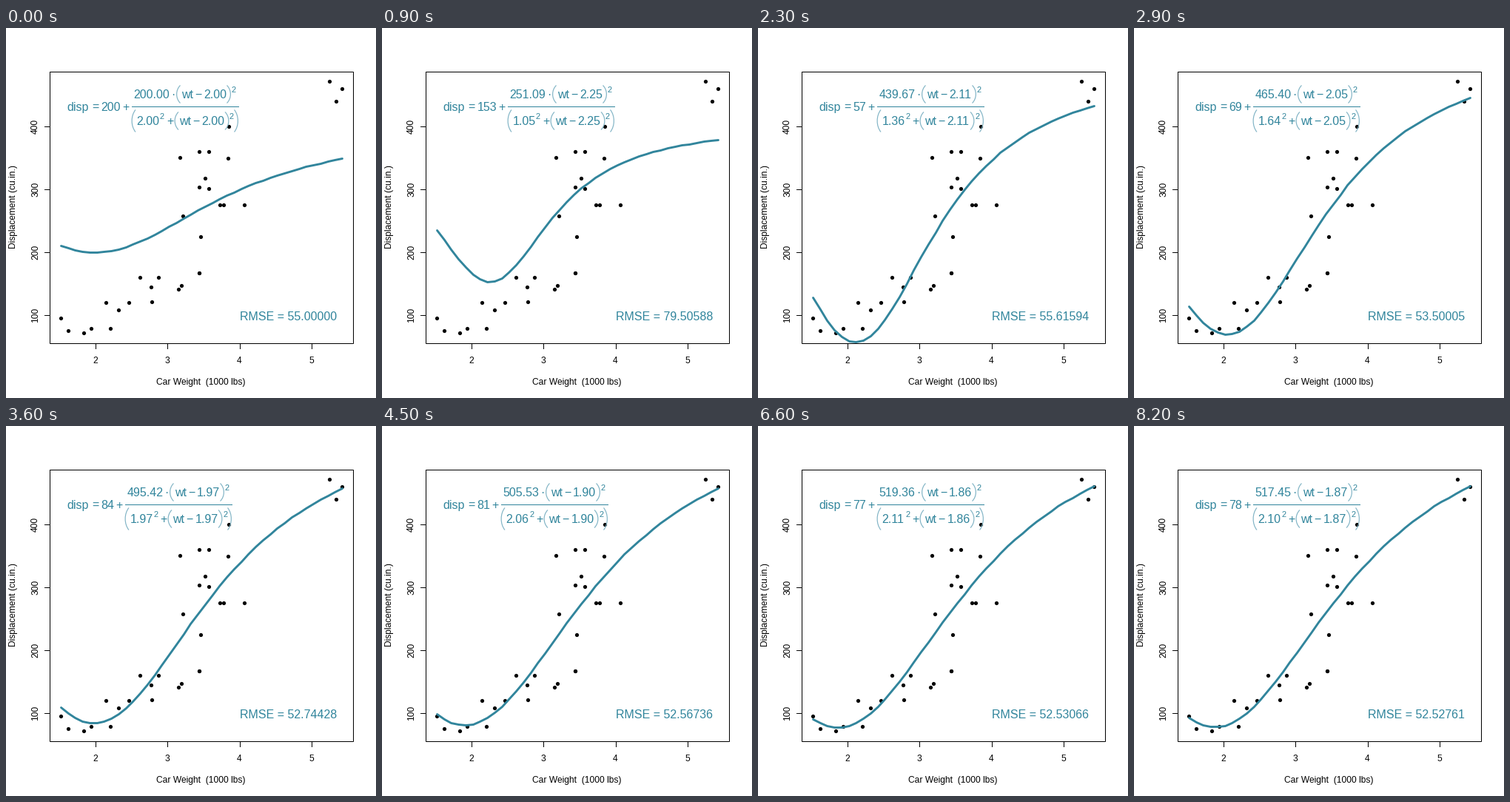
Write a matplotlib script that moves like this. It is 500 px wide and 500 px high and loops after 8300 ms.

```python
import numpy as np
import matplotlib.pyplot as plt
from matplotlib.animation import FuncAnimation
from matplotlib.patches import Circle, PathPatch, Rectangle
from matplotlib.path import Path
from matplotlib.transforms import Affine2D

SIZE, DPI = 500, 100
PT = 72 / DPI                      # points per pixel
TEAL, PALE = "#31859c", "#83b5c6"
FRAMES, INTERVAL = 83, 100
LEFT, RIGHT, TOP, BOTTOM = 59.04, 469.76, 59.04, 426.56

plt.rcParams["font.family"] = "Liberation Sans"

# Car weights by engine displacement
CARS = {71.1: [1.835], 75.7: [1.615], 78.7: [2.2], 79: [1.935], 95.1: [1.513],
        108: [2.32], 120.1: [2.465], 120.3: [2.14], 121: [2.78], 140.8: [3.15],
        145: [2.77], 146.7: [3.19], 160: [2.62, 2.875], 167.6: [3.44, 3.44],
        225: [3.46], 258: [3.215], 275.8: [3.73, 3.78, 4.07], 301: [3.57],
        304: [3.435], 318: [3.52], 350: [3.84], 351: [3.17], 360: [3.44, 3.57],
        400: [3.845], 440: [5.345], 460: [5.424], 472: [5.25]}
disp, weight = np.array([(d, w) for d, ws in CARS.items() for w in ws]).T

# Search path: step -> base, gain, centre, spread
SEARCH = {0: (200, 200, 2, 2),
          9: (153, 251.09, 2.25, 1.05),
          23: (57, 439.67, 2.11, 1.36),
          36: (84, 495.42, 1.97, 1.97),
          54: (78, 515.64, 1.83, 2.15),
          66: (77, 519.36, 1.86, 2.11),
          82: (78, 517.45, 1.87, 2.10)}
START_RMSE = 55


def params(step):
    return [np.interp(step, list(SEARCH), column) for column in zip(*SEARCH.values())]


def model(w, base, gain, centre, spread):
    square = (w - centre) ** 2
    return base + gain * square / (spread ** 2 + square)


def to_pixel(values, data, start, end):
    """Map data to whole pixels with a 4 % margin on both sides."""
    low, high = data.min(), data.max()
    pad = 0.04 * (high - low)
    return np.floor(start + (end - start) * (values - low + pad) / (high - low + 2 * pad))


def px(w):
    return to_pixel(w, weight, LEFT, RIGHT)


def py(d):
    return to_pixel(d, disp, BOTTOM, TOP)


fig = plt.figure(figsize=(SIZE / DPI, SIZE / DPI), dpi=DPI, facecolor="white")
ax = fig.add_axes([0, 0, 1, 1])
ax.set_xlim(0, SIZE)
ax.set_ylim(SIZE, 0)
ax.axis("off")

# The formula slides when its first number loses a digit
slide = Affine2D()
sliding = slide + ax.transData


def label(x, y, text, size=12, color="black", **kw):
    kw = {"ha": "center", "va": "baseline", "rotation_mode": "anchor", **kw}
    return ax.text(x, y, text, fontsize=size * PT, color=color, zorder=5, **kw)


def teal(x, y, text="", size=16, **kw):
    return label(x, y, text, size, TEAL, ha="left", **kw)


def term(x, y, text="", size=16):
    return teal(x, y, text, size, transform=sliding)


def rule(xs, ys, color="black", **kw):
    ax.plot(xs, ys, color=color, lw=PT, solid_capstyle="projecting",
            solid_joinstyle="miter", snap=True, zorder=2, **kw)


def paren(x, middle, half, side):
    """Thin bracket; side is 1 for opening, -1 for closing."""
    tip, bend, pull = x + 2.5 * side, x - 4 * side, 0.46 * half
    path = Path([(tip, middle - half), (bend, middle - pull),
                 (bend, middle + pull), (tip, middle + half)],
                [Path.MOVETO] + [Path.CURVE4] * 3)
    ax.add_patch(PathPatch(path, fill=False, ec=PALE, lw=1.2 * PT, zorder=5,
                           transform=sliding))


def squared_term(x, y):
    """(wt - centre)^2 from its opening bracket; returns the number's text."""
    paren(x, y - 5.5, 12, 1)
    term(x + 4, y, "wt")
    term(x + 22, y, "−")
    number = term(x + 34, y)
    paren(x + 68, y - 5.5, 12, -1)
    term(x + 71.5, y - 8, "2", 11)
    return number


# Frame and axes
rule([59, 469, 469, 59, 59], [59, 59, 426, 426, 59])
for w in range(2, 6):
    rule([px(w)] * 2, [426, 433])
    label(px(w) - 0.5, 453, str(w))
for d in range(100, 500, 100):
    rule([52, 59], [py(d)] * 2)
    label(43, py(d), str(d), rotation=90)
label(263, 482, "Car Weight  (1000 lbs)")
label(13, 242, "Displacement (cu.in.)", rotation=90)

# Data and fitted curve
for x, y in zip(px(weight), py(disp)):
    ax.add_patch(Circle((x + 0.5, y + 0.5), 2.6, fc="black", lw=0, zorder=3))
grid = np.linspace(weight.min(), weight.max(), 40)
curve, = ax.plot(px(grid) + 0.5, grid, color=TEAL, lw=2.9 * PT, snap=False,
                 solid_capstyle="round", solid_joinstyle="round", zorder=4)
curve.set_clip_path(Rectangle((59, 59), 411, 368, transform=ax.transData))

# Formula
teal(82, 112, "disp")
teal(116, 112, "=")
base_text = teal(128.5, 112)
term(157.5, 112, "+")
rule([170, 314], [106, 106], TEAL, transform=sliding)

gain_text = term(172.5, 95)
term(223.5, 95, "·")
centre_texts = [squared_term(233, 95), squared_term(230.5, 131)]
for x, side in ((172.5, 1), (311, -1)):
    paren(x, 125.5, 15, side)
spread_text = term(176.5, 131)
term(208, 123, "2", 11)
term(217, 131, "+")

rmse_text = teal(316, 395)


def update(step):
    fit = base, gain, centre, spread = params(step)
    curve.set_ydata(py(model(grid, *fit)) + 0.5)

    base_text.set_text(f"{base:.0f}")
    gain_text.set_text(f"{gain:.2f}")
    spread_text.set_text(f"{spread:.2f}")
    for text in centre_texts:
        text.set_text(f"{centre:.2f}")

    error = np.sqrt(np.mean((disp - model(weight, *fit)) ** 2))
    rmse_text.set_text(f"RMSE = {error if step else START_RMSE:.5f}")

    slide.clear().translate(-9 * (3 - len(base_text.get_text())), 0)
    return []


anim = FuncAnimation(fig, update, frames=FRAMES, interval=INTERVAL,
                     init_func=lambda: update(0), repeat=True, repeat_delay=0)
plt.show()
```
